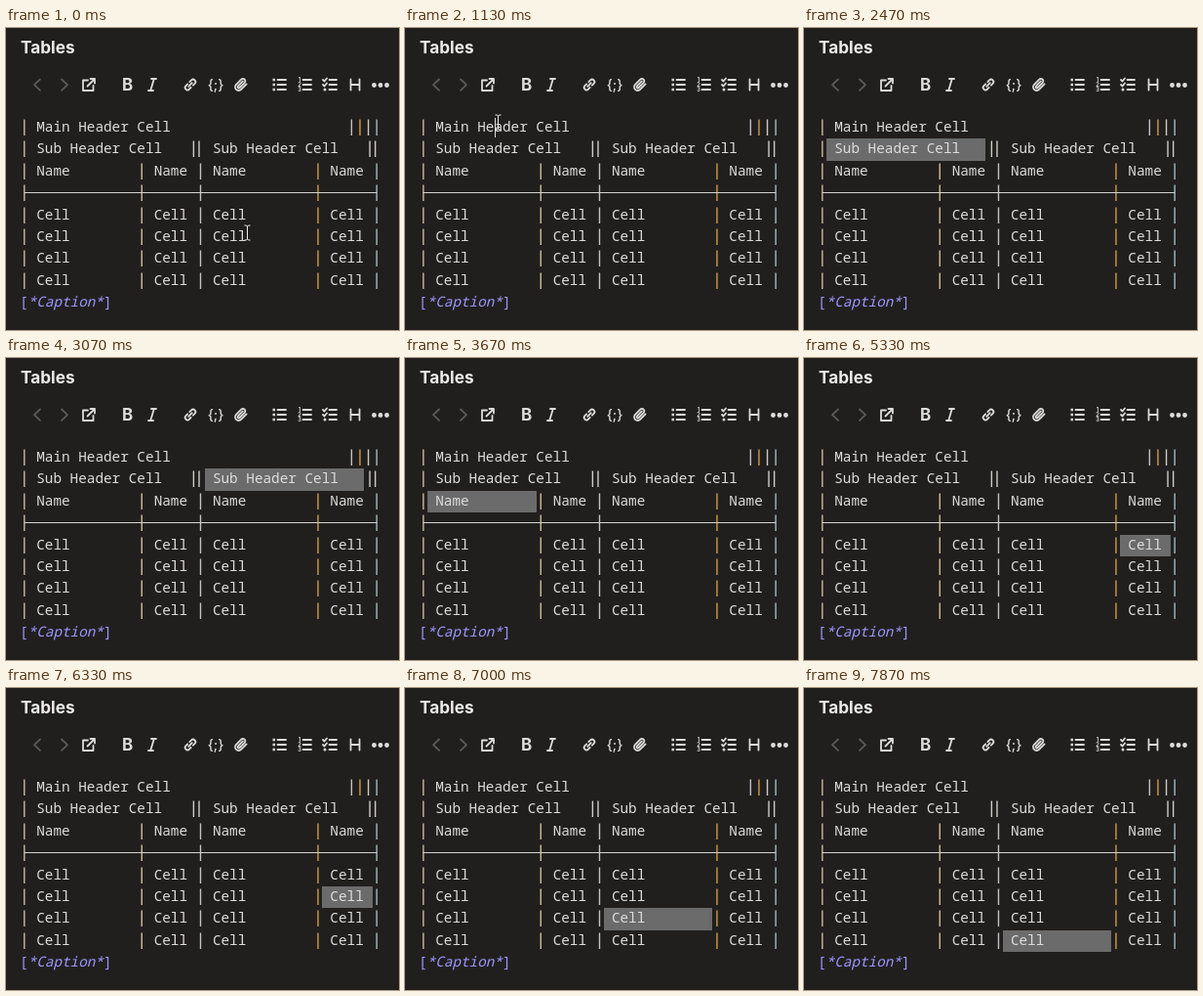
Recreate the animation shown at these times as an HTML page. Size 403 px wide and 309 px high, loop 8000 ms.

```html
<!DOCTYPE html>
<html lang="en">
<head>
<meta charset="utf-8">
<title>Table navigation</title>
<style>
  html, body { margin: 0; width: 100%; height: 100%; overflow: hidden; background: #211f1e; }
  svg { display: block; width: 403px; height: 309px; }
  text { fill: #dcdcdc; }
  .mono { font: 14.34px "Noto Sans Mono", monospace; }
  .caption { fill: #9d97ff; font-weight: 500; }
  .ui { font-family: Inter, sans-serif; font-weight: 700; }
  .icon { fill: none; stroke: #dcdcdc; stroke-width: 1.8; stroke-linecap: round; stroke-linejoin: round; }
  .icon text { stroke: none; text-anchor: middle; }
  .dim { stroke: #5c5a59; }
  .solid { fill: #dcdcdc; stroke: none; }
</style>
</head>
<body>
<svg viewBox="0 0 403 309">
  <text class="ui" x="15" y="25.500" font-size="17.200" style="fill:#ececec">Tables</text>

  <g class="icon">
    <path class="dim" d="M35 52.500l-6 5.700 6 5.700M57 52.500l6 5.700-6 5.700"/>
    <path transform="translate(85 58)" d="M-1-4.500H-6V6H4.500V1M1.500-6H6V-1.500M6-6L-1.500 1.500"/>
    <text class="ui" x="124.500" y="64" font-size="17">B</text>
    <path transform="translate(150 58)" d="M-1-6H4M-4 6H1M1.800-6L-1.800 6"/>
    <path transform="translate(189 58) rotate(-45)" d="M-1.500-2.500H-4a2.500 2.500 0 0 0 0 5H-1.500M1.500-2.500H4a2.500 2.500 0 0 1 0 5H1.500M-2.500 0h5"/>
    <text class="ui" x="215" y="62.500" font-size="14" style="font-weight:500">{;}</text>
    <path transform="translate(241 58) scale(.6) translate(-12 -12)" stroke-width="3" d="M21.400 11l-9.200 9.200a6 6 0 0 1-8.500-8.500l8.600-8.500A4 4 0 1 1 18 8.800l-8.600 8.600a2 2 0 0 1-2.800-2.800l8.500-8.500"/>
    <g transform="translate(280 58)">
      <path d="M-1.500-5H7M-1.500 0H7M-1.500 5H7"/>
      <path class="solid" d="M-6.500-6.200h2.500v2.500h-2.500zM-6.500-1.200h2.500v2.500h-2.500zM-6.500 3.800h2.500v2.500h-2.500z"/>
    </g>
    <g transform="translate(306 58)">
      <path d="M-1.500-5H7M-1.500 0H7M-1.500 5H7"/>
      <g class="ui" font-size="5.500">
        <text x="-5" y="-2.800">1</text><text x="-5" y="2.200">2</text><text x="-5" y="7.200">3</text>
      </g>
    </g>
    <g transform="translate(332 58)">
      <path d="M-.5-5H7M-.5 0H7M-.5 5H7M-7-5l1.500 1.500 2.500-3M-7 0l1.500 1.500 2.500-3"/>
      <circle class="solid" cx="-5" cy="5" r="1.500"/>
    </g>
    <path transform="translate(358 58)" d="M-4.500-5.500V5.500M4.500-5.500V5.500M-4.500 0H4.500"/>
    <g class="solid"><circle cx="377.500" cy="58.500" r="2.400"/><circle cx="384" cy="58.500" r="2.400"/><circle cx="390.500" cy="58.500" r="2.400"/></g>
  </g>

  <rect id="selection" fill="#6b6b6b"/>
  <g id="table"></g>
  <rect id="caret" width="1" height="20" fill="#dcdcdc"/>
  <path id="pointer" d="M-3-7.500h2L0-6.500 1-7.500h2M0-6.500v13M-3 7.500h2L0 6.500 1 7.500h2" fill="none" stroke="#f0f0f0"/>
</svg>

<script>
const LEFT = 14.5, PITCH = 8.604, TOP = 91, LINE = 22.4, LOOP = 8000;
const byId = id => document.getElementById(id);
const table = byId("table");
const charX = index => LEFT + index * PITCH;
const rowY = row => Math.round(TOP + row * LINE);

function add(tag, attributes, content = "") {
  const node = document.createElementNS("http://www.w3.org/2000/svg", tag);
  for (const name in attributes) node.setAttribute(name, attributes[name]);
  node.textContent = content;
  table.append(node);
}
const write = (row, index, content, className = "", style = "") =>
  add("text", { class: "mono " + className, x: charX(index) - 0.5, y: rowY(row) + 15, style }, content);
const pipe = (row, x, fill = "#cfccc6") =>
  add("rect", { x: x - 0.7, y: rowY(row) + 2.5, width: 1.4, height: 16.5, fill });
const pipeX = index => charX(index + 0.5);

// Pipe tints vary by column, like subpixel rendering.
const pipes = { 0: "#c8b99b", 14: "#d0bf98", 21: "#c3c1c8", 35: "#cf9c48", 42: "#9dbac2" };
const textColumns = [2, 16, 23, 37];

write(0, 2, "Main Header Cell");
pipe(0, pipeX(0), pipes[0]);
pipe(0, pipeX(39), pipes[21]);
pipe(0, pipeX(40), pipes[35]);
pipe(0, pipeX(41));
pipe(0, pipeX(42), pipes[42]);

pipe(1, pipeX(0), pipes[0]);
for (const [index, bar] of [[2, 21], [23, 42]]) {
  write(1, index, "Sub Header Cell");
  pipe(1, charX(bar) - 2.8);
  pipe(1, charX(bar) + 2.8);
}

for (let row = 2; row < 8; row++) {
  for (const index in pipes) pipe(row, pipeX(+index), pipes[index]);
  if (row !== 3) for (const index of textColumns) write(row, index, row === 2 ? "Name" : "Cell");
}
add("rect", { x: pipeX(0), y: 168, width: pipeX(42) - pipeX(0), height: 1, fill: "#d4d2ce" });

write(8, 0, "[", "caption");
write(8, 1, "*Caption*", "caption", "font-style:italic");
write(8, 10, "]", "caption");

// Stops: time, row, first character, length (0 shows a caret).
const stops = [
  [1070, 0, 9, 0], [1470, 0, 40, 0], [2000, 0, 41, 0], [2270, 0, 42, 0],
  [2470, 1, 1, 19], [2730, 1, 21, 0], [3070, 1, 22, 19], [3330, 1, 42, 0]
];
const cells = [[1, 13], [15, 6], [22, 13], [36, 6]];
const visits = {
  2: [3670, 3870, 4130, 4400],
  4: [4600, 4930, 5130, 5330],
  5: [5600, 5870, 6070, 6330],
  6: [6530, 6730, 7000, 7200],
  7: [7470, 7670, 7870]
};
for (const row in visits)
  visits[row].forEach((time, i) => stops.push([time, +row, ...cells[i]]));

const pointerPath = [[0, 248, 210], [270, 264, 241], [930, 96, 100], [1000, 96, 95], [1070, 96, 97], [1270, 150, 289]];

function pointerAt(time) {
  const next = pointerPath.findIndex(point => point[0] > time);
  if (next < 1) return null;
  const [t0, x0, y0] = pointerPath[next - 1], [t1, x1, y1] = pointerPath[next];
  const u = (time - t0) / (t1 - t0), eased = u * u * (3 - 2 * u);
  return [x0 + (x1 - x0) * eased, y0 + (y1 - y0) * eased];
}

function place(node, attributes) {
  node.style.display = attributes ? "" : "none";
  for (const name in attributes) node.setAttribute(name, attributes[name]);
}

function draw(now) {
  const time = now % LOOP;
  const stop = stops.findLast(item => item[0] <= time);
  let selection = null, caret = null;
  if (stop) {
    const [, row, start, length] = stop;
    const x = Math.round(charX(start) - 0.2), y = rowY(row);
    if (length) selection = {
      x, y, width: Math.round(charX(start + length) - 0.2) - x, height: rowY(row + 1) - y
    };
    else caret = { x, y: y + 1 };
  }
  place(byId("selection"), selection);
  place(byId("caret"), caret);

  const tick = 1000 / 15;
  const point = pointerAt(Math.floor(time / tick) * tick);
  place(byId("pointer"), point && { transform: `translate(${point.map(v => Math.round(v) - 0.5)})` });
  requestAnimationFrame(draw);
}
requestAnimationFrame(draw);
</script>
</body>
</html>
```
